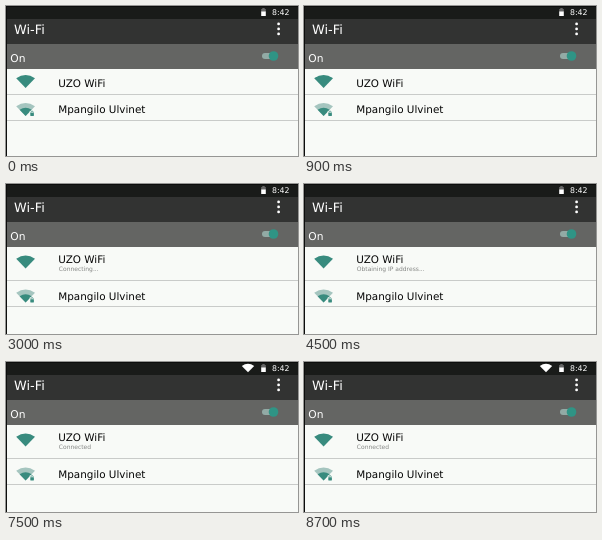
Recreate the animation shown at these times as an HTML page. Size 292x150 px, loop 9.5 s.

```html
<!DOCTYPE html>
<html lang="en">
<head>
<meta charset="utf-8">
<title>Wi-Fi settings</title>
<style>
  html, body { margin: 0; width: 100%; height: 100%; overflow: hidden; background: #f8faf7; }
  svg { display: block; width: 100%; height: 100%; }
  text { font-family: "DejaVu Sans", Verdana, sans-serif; text-rendering: geometricPrecision; }
  .bar { fill: #fff; }
  .name { font-size: 10.4px; fill: #050505; }
  .note { font-size: 6px; fill: #858785; }
  .rule { fill: #c9cbc9; }
</style>
</head>
<body>
<svg viewBox="0 0 292 150">
  <defs>
    <path id="fan" d="M-9.4 -7.2Q0 -13.6 9.4 -7.2L0 2.5Z"/>
  </defs>

  <rect width="292" height="150" fill="#f8faf7"/>
  <rect width="292" height="13" fill="#191b19"/>
  <rect y="13" width="292" height="25" fill="#323332"/>
  <rect y="38" width="292" height="25" fill="#646563"/>
  <path d="M0 0h292v1H1v149H0z" fill="#0c0d0c"/>

  <use id="signal" href="#fan" transform="translate(242 8.7) scale(.66)" fill="#fff"/>
  <path d="M256.3 2h2.4v1h1.1v3h-4.6V3h1.1z" fill="#666"/>
  <path d="M255.2 5.5h4.6v4.6h-4.6z" fill="#fff"/>
  <text class="bar" x="266" y="9.4" font-size="7.8">8:42</text>

  <text class="bar" x="8" y="27.7" font-size="12.9">Wi-Fi</text>
  <g fill="#fff">
    <circle cx="272.6" cy="17.9" r="1.4"/>
    <circle cx="272.6" cy="22.9" r="1.4"/>
    <circle cx="272.6" cy="27.9" r="1.4"/>
  </g>

  <text class="bar" x="4.3" y="55.6" font-size="10.7">On</text>
  <rect x="256" y="47" width="15" height="6" rx="3" fill="#92aaa5"/>
  <circle cx="267.5" cy="50" r="4.8" fill="#2f9485"/>

  <g id="icon1"><use href="#fan" fill="#388b7e"/></g>
  <text id="name1" class="name" x="52.3">UZO WiFi</text>
  <text id="note" class="note" x="52.8" y="86.7"></text>
  <rect id="rule1" class="rule" x="1" width="291" height="1"/>

  <g id="icon2">
    <use href="#fan" fill="#a5c5bf"/>
    <path d="M-6 -3.7Q0 -8 6 -3.7L0 2.5Z" fill="#388b7e"/>
    <rect x="4.1" y="-2.6" width="5" height="5.6" fill="#f8faf7"/>
    <path d="M5.4 -.6v-.7a1.1 1.1 0 0 1 2.2 0v.7" fill="none" stroke="#388b7e" stroke-width=".7"/>
    <rect x="4.7" y="-.7" width="3.6" height="3.1" rx=".4" fill="#388b7e"/>
  </g>
  <text id="name2" class="name" x="52.3">Mpangilo Ulvinet</text>
  <rect id="rule2" class="rule" x="1" width="291" height="1"/>
</svg>
<script>
  const LOOP = 9500;
  const CONNECTED = 7500;
  const steps = [
    [0, ""],
    [1500, "Saved"],
    [3000, "Connecting..."],
    [4500, "Obtaining IP address..."],
    [CONNECTED, "Connected"]
  ];
  const compact = { icon1: 79.5, name1: 80.7, rule1: 88, icon2: 107.5, name2: 107.3, rule2: 114 };
  const expanded = { icon1: 82, name1: 78.9, rule1: 96, icon2: 116, name2: 116.2, rule2: 122 };
  const byId = id => document.getElementById(id);

  function place(id, y) {
    const el = byId(id);
    if (id.startsWith("icon")) el.setAttribute("transform", `translate(19.6 ${y})`);
    else el.setAttribute("y", y);
  }

  function render(time) {
    const t = time % LOOP;
    const [, status] = steps.filter(([from]) => t >= from).pop();
    const layout = status ? expanded : compact;
    for (const id in layout) place(id, layout[id]);
    byId("note").textContent = status;
    byId("signal").style.display = t >= CONNECTED ? "" : "none";
  }

  const begin = performance.now();
  function tick() {
    render(performance.now() - begin);
    requestAnimationFrame(tick);
  }
  tick();
</script>
</body>
</html>
```
